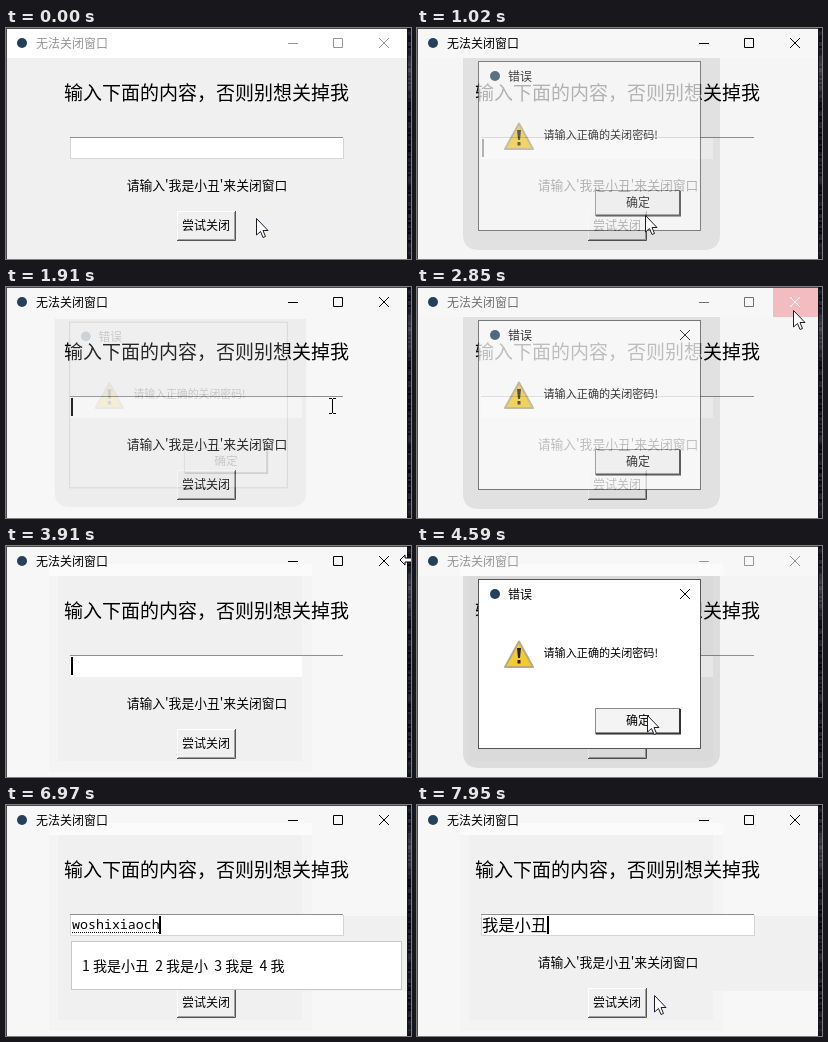
Write an HTML page that moves like this. It is 405x231 px and loops after 8000 ms.

```html
<!DOCTYPE html>
<html lang="zh-CN">
<head>
<meta charset="utf-8">
<title>无法关闭窗口</title>
<style>
html, body { margin: 0; width: 100%; height: 100%; overflow: hidden; background: #f0f0f0; }
svg { display: block; width: 100vw; height: 100vh; }
text { font-family: "Noto Sans CJK SC", "Noto Sans CJK", "Noto Sans", sans-serif; font-size: 12px; fill: #000; white-space: pre; }
.line { fill: none; stroke: #000; stroke-width: 1; }
#heading { font-size: 19px; font-weight: 300; }
#prompt { font-size: 12.8px; }
#typed { font-size: 16.3px; font-weight: 300; }
#pinyin { font-family: "Noto Sans Mono", monospace; font-size: 13.3px; }
#choices { font-size: 14px; }
</style>
</head>
<body>
<svg viewBox="0 0 405 231" preserveAspectRatio="none">
  <rect width="405" height="231" fill="#14151c"/>
  <g id="desktop"></g>
  <rect id="client" width="401" height="231"/>
  <rect id="titleBar" width="401" height="30"/>

  <g id="patch">
    <rect x="43" y="30" width="263" height="196" fill="#f4f4f4"/>
    <rect x="43" y="18" width="263" height="12" fill="#fbfbfb"/>
    <rect x="52" y="30" width="244" height="185" fill="#f0f0f0"/>
  </g>
  <rect id="sidePatch" x="296" y="111" height="75" fill="#f0f0f0"/>

  <rect id="hover" x="356" y="1" width="45" height="29" fill="#e81123"/>
  <circle cx="16" cy="15" r="5" fill="#24405c"/>
  <text id="title" x="30" y="20">无法关闭窗口</text>
  <g id="controls" class="line">
    <path d="M282 15.5h10M327.5 10.5h9v9h-9z"/>
    <path id="cross" d="M373 10l10 10M383 10l-10 10"/>
  </g>
  <path d="M0 .5h401M.5 0v231" class="line" style="stroke:#4a4a4a"/>

  <text id="heading" x="58" y="72">输入下面的内容，否则别想关掉我</text>

  <rect id="field" x="64" y="110" height="21" fill="#fff"/>
  <path d="M64 109.5h273" class="line" style="stroke:#8f8f8f"/>
  <path id="fieldEdge" d="M64.5 110v20M64 130.5h274M337.5 110v21" class="line" style="stroke:#d5d5d5"/>
  <text id="typed" x="65" y="126">我是小丑</text>
  <text id="pinyin" x="66" y="124"></text>
  <path id="underline" class="line" stroke-dasharray="1 1"/>
  <rect id="caret" y="111" width="2" height="18"/>

  <text id="prompt" x="201" y="162" text-anchor="middle">请输入'我是小丑'来关闭窗口</text>

  <rect x="171" y="183" width="59" height="30" fill="#f0f0f0"/>
  <path d="M171.5 212v-28.5H229" class="line" style="stroke:#fff"/>
  <path d="M172 211.5h56.5V184" class="line" style="stroke:#a0a0a0"/>
  <path d="M171 212.5h58.5V183" class="line" style="stroke:#555"/>
  <text x="176" y="202">尝试关闭</text>

  <g id="popup">
    <path id="shadow" d="M46 30H303V206Q303 222 287 222H62Q46 222 46 206Z"/>
    <g id="dialog">
      <rect x="61.5" y="33.5" width="222" height="169" fill="#fff" stroke="#555"/>
      <circle cx="78" cy="48" r="5" fill="#24405c"/>
      <text x="91" y="53">错误</text>
      <path id="dialogCross" d="M263 43l10 10M273 43l-10 10" class="line"/>
      <path d="M102 95.5L116 121H88Z" fill="#f4cb2c" stroke="#b5ab8c" stroke-width="2" stroke-linejoin="round"/>
      <path d="M100 102h4l-1 10h-2zM100.5 114h3v3.5h-3z" fill="#222"/>
      <text x="126.5" y="111" style="font-size:11.1px">请输入正确的关闭密码!</text>
      <rect x="178" y="162" width="86" height="27" fill="#f4f4f4"/>
      <path d="M178.5 188v-25.5H263" class="line" style="stroke:#8a8a8a"/>
      <path d="M179 187.5h84V163" class="line" style="stroke:#333;stroke-width:2"/>
      <text x="221" y="179" text-anchor="middle" style="font-weight:500">确定</text>
    </g>
  </g>

  <g id="ime">
    <rect id="imeBox" x="65.5" y="136.5" height="48" fill="#fff" stroke="#c8c8c8"/>
    <text id="choices" x="76" y="166"></text>
  </g>

  <path id="arrow" d="M.5 .5V17L4.5 13.5L7 19.5L9.500 18.5L7 12.500H12Z" fill="#fff" stroke="#1c1c2c" stroke-linejoin="round"/>
  <path id="beam" d="M-3-7.500H0M1-7.500H4M.5-7V7M-3 7.500H0M1 7.500H4" class="line"/>
  <path id="resize" d="M394 14l5-5v3h10v4h-10v3Z" fill="#fff" stroke="#000"/>
</svg>

<script>
const LOOP = 8000;
const FADE = 230;
const TYPE_START = 6090;
const TYPE_END = 7330;
const PHRASE = '我是小丑';
const SYLLABLES = ['wo', 'shi', 'xiao', 'chou'];
const LETTERS = SYLLABLES.join('');

// Each time the error dialog appears; its ghost lingers until "gone".
const VISITS = [
  { hover: -FADE, open: 60, close: 960, gone: 2230 },
  { hover: 2380, open: 2680, close: 3120, gone: 3580 },
  { hover: 4090, open: 4200, close: 4720, gone: 5440 }
];

// Pointer moves: start, end, x, y.
const MOVES = [
  [60, 780, 228, 187],
  [1060, 1910, 326, 119],
  [1950, 2230, 376, 23],
  [2940, 3260, 420, 15],
  [3750, 3760, 404, 13],
  [4060, 4270, 380, 20],
  [4270, 4640, 222, 176],
  [4860, 5440, 208, 125],
  [7480, 7950, 237, 190]
];

const $ = id => document.getElementById(id);
const set = (id, attrs) => {
  for (const name in attrs) $(id).setAttribute(name, attrs[name]);
};
const show = (id, on) => set(id, { visibility: on ? 'visible' : 'hidden' });
const ramp = (t, a, b) => Math.min(1, Math.max(0, (t - a) / (b - a)));
const mix = (a, b, k) => a + (b - a) * k;
const ease = k => k * k * (3 - 2 * k);
const grey = v => `rgb(${[v, v, v].map(Math.round)})`;

function drawDesktop() {
  let seed = 7, rows = '';
  for (let y = 0; y < 231; y += 2) {
    seed = seed * 16807 % 2147483647;
    const light = seed % 40 + 40 * Math.exp(-(((y - 42) / 18) ** 2));
    rows += `<rect x="402" y="${y}" width="3" height="2" fill="rgb(${light},${light + 3},${light + 14})"/>`;
  }
  $('desktop').innerHTML = rows;
}

function popupState(t) {
  const visit = VISITS.filter(v => t >= v.hover).pop();
  const { hover, open, close, gone } = visit;
  const closed = t >= close;
  const opening = ramp(t, open, open + FADE);
  const ghost = (.15 + .85 * Math.exp((close - t) / 138)) * (1 - ramp(t, gone - 320, gone));
  const unfocused = visit === VISITS[0] ? 1 : opening;
  return {
    closed,
    focused: closed || t < open,
    alpha: closed ? ghost : opening,
    scale: mix(1, .98, ramp(t, close + 60, close + 240)),
    inactive: closed ? 1 - ramp(t, close, close + 50) : unfocused,
    hover: hover < 0 ? 0 : ramp(t, hover, hover + 100) * (1 - opening)
  };
}

function drawWindow(t, popup) {
  const warm = ramp(t, 60, 300);
  const tone = grey(150 * popup.inactive);
  const dim = 3 * popup.alpha;
  set('client', { fill: grey(mix(240, 247 - dim, warm)) });
  set('titleBar', { fill: grey(mix(255, 247, warm)) });
  set('patch', { opacity: ramp(t, 3260, 3580) });
  set('hover', { opacity: popup.hover });
  $('title').style.fill = tone;
  $('controls').style.stroke = tone;
  $('cross').style.stroke = popup.hover > .15 ? '#fff' : tone;
}

function drawPopup({ alpha, scale, closed }) {
  set('popup', { transform: `translate(172.5 118) scale(${scale}) translate(-172.5 -118)` });
  set('dialog', { opacity: alpha });
  set('shadow', { opacity: .095 * alpha ** .45 });
  show('dialogCross', !closed);
}

function drawInput(t, popup) {
  const done = t >= TYPE_END;
  const typing = t >= TYPE_START && !done;
  const full = t < 60 || t >= TYPE_START;
  const count = typing ? Math.min(LETTERS.length, 1 + Math.floor((t - TYPE_START) / 88)) : 0;

  set('field', { width: full ? 274 : 232 });
  show('fieldEdge', full);
  show('typed', done);
  show('caret', popup.focused && t > 60);
  set('caret', { x: done ? 130 : 65 + count * 8 });
  set('sidePatch', { width: done ? 105 : Math.min(105, count * 10) });

  show('ime', typing);
  show('underline', typing);
  $('pinyin').textContent = LETTERS.slice(0, count);
  set('underline', { d: `M66 127.5h${count * 8}` });
  set('imeBox', { width: Math.min(335, 220 + count * 10) });
  const begun = SYLLABLES.filter((s, i) => SYLLABLES.slice(0, i).join('').length < count).length;
  $('choices').textContent = Array.from({ length: begun },
    (_, i) => `${i + 1} ${PHRASE.slice(0, begun - i)}`).join('  ');
}

function drawPointer(t) {
  let x = 250, y = 190;
  for (const [start, end, toX, toY] of MOVES) {
    const k = ease(ramp(t, start, end));
    x = mix(x, toX, k);
    y = mix(y, toY, k);
  }
  const overField = x > 64 && x < 338 && y > 108 && y < 131;
  const covered = t > VISITS[2].open && t < VISITS[2].gone - FADE;
  const beam = overField && !covered;
  const resize = t >= 3910 && t < 4060;
  const hidden = t >= TYPE_START && t < 7480;
  show('beam', beam && !hidden);
  show('resize', resize);
  show('arrow', !beam && !resize && !hidden);
  const transform = `translate(${Math.round(x)} ${Math.round(y)})`;
  set('beam', { transform });
  set('arrow', { transform });
}

function render(t) {
  const popup = popupState(t);
  drawWindow(t, popup);
  drawInput(t, popup);
  drawPopup(popup);
  drawPointer(t);
}

drawDesktop();
const start = performance.now();
function tick() {
  render((performance.now() - start) % LOOP);
  requestAnimationFrame(tick);
}
tick();
</script>
</body>
</html>
```
